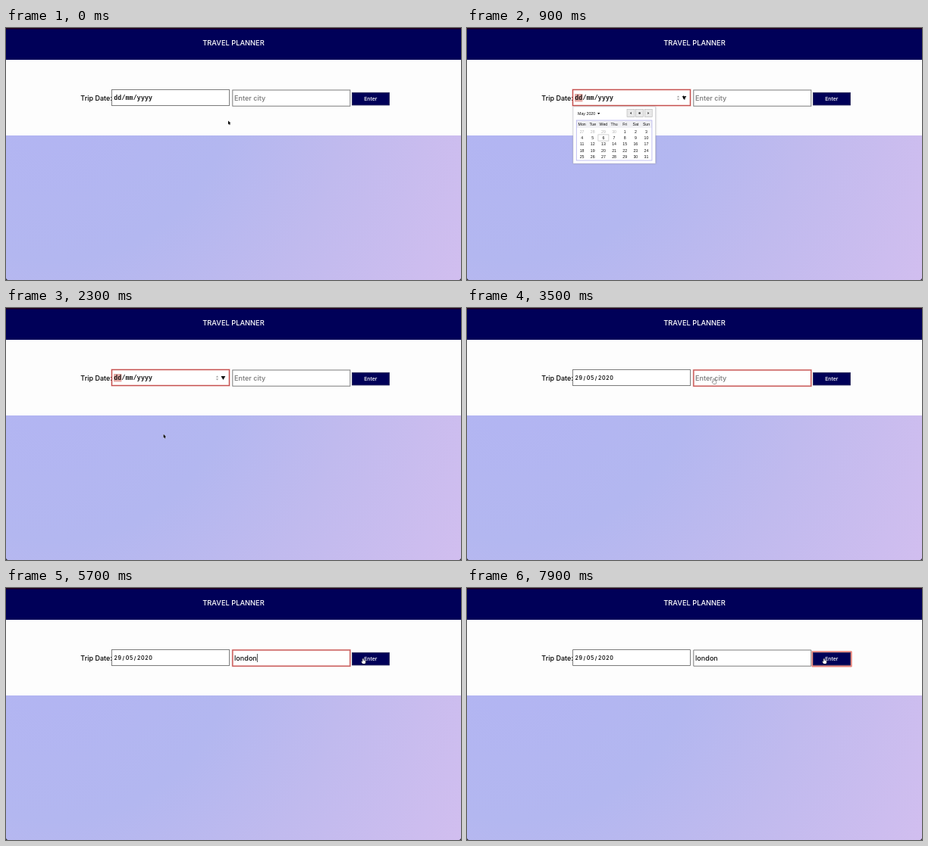
Animation of 600 by 333 pixels, one loop 8 s. Source, as an HTML page with a canvas:

```html
<!DOCTYPE html>
<html lang="en">
<head>
<meta charset="utf-8">
<title>Travel planner</title>
<style>
html, body { margin: 0; width: 100%; height: 100%; overflow: hidden; background: #fdfdfd; }
canvas { display: block; width: 600px; height: 333px; }
</style>
</head>
<body>
<canvas id="stage"></canvas>
<script>
const W = 600, H = 333, LOOP = 8000, STEP = 100;
const canvas = document.getElementById('stage');
const ctx = canvas.getContext('2d');
const dpr = window.devicePixelRatio || 1;
canvas.width = W * dpr;
canvas.height = H * dpr;

const UI = 'Inter, sans-serif';
const MONO = '"Liberation Mono", monospace';
const SMALL = '"Liberation Sans", sans-serif';
const NAVY = '#000058', RED = '#c4504f', INK = '#111';

// Start time of each typed state
const TYPING = [[3700, 'l'], [3900, 'lo'], [4100, 'lon'], [4500, 'lond'], [4700, 'londo'], [4800, 'london']];

// Pointer legs: start, end, from, control point, to
const LEGS = [
  [0, 500, [293, 122.5], [292, 105], [285, 89]],
  [1000, 1900, [285, 89], [262, 135], [207.7, 166.8]],
  [2300, 2800, [207.7, 166.8], [262, 118], [325.5, 93]],
  [5000, 5600, [325.5, 93], [392, 141], [471, 92.8]]
];

function rect(x, y, w, h, fill) {
  ctx.fillStyle = fill;
  ctx.fillRect(x, y, w, h);
}

function frame(x, y, w, h, color, line = 1) {
  ctx.strokeStyle = color;
  ctx.lineWidth = line;
  ctx.strokeRect(x, y, w, h);
}

function text(str, x, y, font, color = INK, align = 'left') {
  ctx.font = font;
  ctx.fillStyle = color;
  ctx.textAlign = align;
  ctx.fillText(str, x, y);
}

function poly(points, fill, stroke, line = 1) {
  ctx.beginPath();
  points.forEach(([x, y]) => ctx.lineTo(x, y));
  ctx.closePath();
  if (stroke) {
    ctx.strokeStyle = stroke;
    ctx.lineWidth = line;
    ctx.lineJoin = 'round';
    ctx.stroke();
  }
  ctx.fillStyle = fill;
  ctx.fill();
}

function page() {
  rect(0, 0, W, H, '#fdfdfd');
  rect(0, 0, W, 42, NAVY);
  rect(0, 0, W, 1.5, '#22001c');
  const cx = W * 0.1, cy = H * 0.2;
  const g = ctx.createRadialGradient(cx, cy, 0, cx, cy, Math.hypot(W - cx, H - cy));
  g.addColorStop(0, '#b2b4f3');
  g.addColorStop(0.4, '#b3b7f0');
  g.addColorStop(0.65, '#c0baee');
  g.addColorStop(1, '#d1beef');
  rect(0, 142, W, H - 142, g);
  poly([[0, H - 2.5], [0.8, H - 0.8], [2.5, H], [0, H]], '#222');
  poly([[W, H - 2.5], [W - 0.8, H - 0.8], [W - 2.5, H], [W, H]], '#222');
  text('TRAVEL PLANNER', 300, 22.9, '500 9.3px ' + UI, '#fff', 'center');
  text('Trip Date:', 98.3, 95.8, '500 9px ' + UI, '#000');
}

function field(x, y, w, h, focused) {
  rect(x, y, w, h, '#fff');
  if (focused) {
    frame(x, y, w, h, 'rgba(222,110,105,.3)', 2.4);
    frame(x, y, w, h, RED, 1.2);
  } else {
    frame(x, y, w, h, '#7c7c7c');
  }
}

// One character per cell of equal width
function cells(str, x, y, pitch, font) {
  [...str].forEach((ch, i) => text(ch, x + (i + 0.5) * pitch, y, font, INK, 'center'));
}

function dateField(t) {
  const focused = t >= 500 && t < 2900;
  field(139.5, 81.5, 155, 21, focused);
  if (focused) {
    rect(142, 87, 10.4, 10.5, '#e5aaa5');
    poly([[276.8, 91.5], [280.2, 91.5], [278.5, 89.5]], '#999');
    poly([[276.8, 93.5], [280.2, 93.5], [278.5, 95.5]], '#999');
    poly([[283.5, 90], [289.3, 90], [286.4, 95]], INK);
  }
  if (t >= 2400) cells('29/05/2020', 142.1, 95.2, 5.1, '600 7px ' + UI);
  else cells('dd/mm/yyyy', 142.1, 95.2, 5.1, 'bold 8.2px ' + MONO);
}

function cityField(t) {
  const focused = t >= 2900 && t < 5800;
  let typed = '';
  for (const [at, str] of TYPING) if (t >= at) typed = str;
  field(298.8, 82, 155, 21.2, focused);
  text(typed || 'Enter city', 301, 96.2, '500 9.1px ' + UI, typed ? INK : '#757575');
  if (focused && (t < 3500 || t >= 3700)) {
    const x = 301 + (typed ? ctx.measureText(typed).width : 0);
    rect(x + 0.1, 87, 0.8, 11, '#222');
  }
}

function button(t) {
  const pressed = t === 5800 || t === 6800 || t === 7800;
  if (t >= 5800) {
    ctx.lineJoin = 'round';
    frame(455.6, 84.4, 51, 18.8, '#e8877f', 2.4);
  }
  rect(456.2, 85.2, 49.6, 17, NAVY);
  frame(456.6, 85.6, 48.8, 16.2, pressed ? '#15153c' : '#33335f', 0.8);
  text('Enter', 480.8, 96.2, '500 6.8px ' + UI, '#fff', 'center');
}

function calendar(hover) {
  ctx.save();
  ctx.shadowColor = 'rgba(0,0,0,.25)';
  ctx.shadowBlur = 2 * dpr;
  rect(140, 104, 108.5, 75, '#fff');
  ctx.restore();
  frame(140, 104, 108.5, 75, '#c4c4cc', 0.5);
  text('May 2020', 146, 114.9, '5.3px ' + SMALL);
  poly([[172, 112], [175.4, 112], [173.7, 114.2]], INK);

  for (let i = 0; i < 3; i++) {
    const x = 211 + i * 11.6;
    rect(x, 107.5, 10, 10, '#e9e9e9');
    frame(x, 107.5, 10, 10, '#b4b4b4', 0.6);
    const c = x + 5, d = i - 1;
    if (d) {
      poly([[c - d * 0.9, 111.1], [c - d * 0.9, 113.9], [c + d * 1.1, 112.5]], '#333');
    } else {
      ctx.beginPath();
      ctx.arc(c, 112.5, 1.3, 0, Math.PI * 2);
      ctx.fillStyle = '#333';
      ctx.fill();
    }
  }

  rect(144.3, 122, 99.6, 10, '#f0f0f4');
  frame(144.3, 122, 99.6, 53, '#b3b1ed', 0.8);
  const font = '5.2px ' + SMALL;
  const colX = c => 151.6 + c * 14.15;
  ['Mon', 'Tue', 'Wed', 'Thu', 'Fri', 'Sat', 'Sun'].forEach((d, c) =>
    text(d, colX(c), 129.2, font, INK, 'center'));
  for (let i = 0; i < 35; i++) {
    const x = colX(i % 7), y = 136.6 + Math.floor(i / 7) * 8.4;
    const day = i < 4 ? 27 + i : i - 3;
    const over = hover && Math.abs(hover[0] - x) < 7.07 && Math.abs(hover[1] - y) < 4.2;
    if (over) rect(x - 7, y - 4.1, 14, 8.2, '#dcdcf8');
    if (i === 9) frame(x - 7, y - 4.1, 14, 8.2, '#b5b5b5', 0.6);
    text(day, x, y + 1.9, font, i < 4 ? '#b5b5b5' : INK, 'center');
  }
}

function pointerAt(t) {
  let pos = LEGS[0][2];
  for (const [start, end, a, c, b] of LEGS) {
    if (t < start) break;
    const p = Math.min(1, (t - start) / (end - start));
    const k = p * p * (3 - 2 * p), m = 1 - k;
    pos = a.map((v, i) => m * m * v + 2 * m * k * c[i] + k * k * b[i]);
  }
  return pos;
}

function inside([x, y], l, t, r, b) {
  return x > l && x < r && y > t && y < b;
}

function pointer(pos) {
  const hand = inside(pos, 299, 82, 454, 103) || inside(pos, 456, 85, 506, 102);
  ctx.save();
  ctx.translate(pos[0], pos[1]);
  if (hand) {
    poly([[-0.7, 0.6], [0.5, 0.6], [0.6, 3], [3.2, 3.6], [3, 6], [2.4, 7.2],
      [-0.6, 7.2], [-2.4, 4.8], [-1.8, 4.2], [-0.8, 5]], '#fff', '#333', 0.9);
  } else {
    ctx.scale(0.85, 0.85);
    poly([[0, 0], [0, 5.8], [1.3, 4.7], [2.2, 6.8], [3.2, 6.3], [2.3, 4.4], [4, 4.2]],
      '#000', '#fff', 0.6);
  }
  ctx.restore();
}

function draw(t) {
  ctx.setTransform(dpr, 0, 0, dpr, 0, 0);
  const pos = pointerAt(t);
  page();
  dateField(t);
  cityField(t);
  button(t);
  if (t >= 600 && t < 2200) calendar(t >= 1100 ? pos : null);
  if (t < 3700 || t >= 5100) pointer(pos);
}

function tick(now) {
  draw(Math.floor((now % LOOP) / STEP) * STEP);
  requestAnimationFrame(tick);
}
draw(0);
requestAnimationFrame(tick);
</script>
</body>
</html>
```
